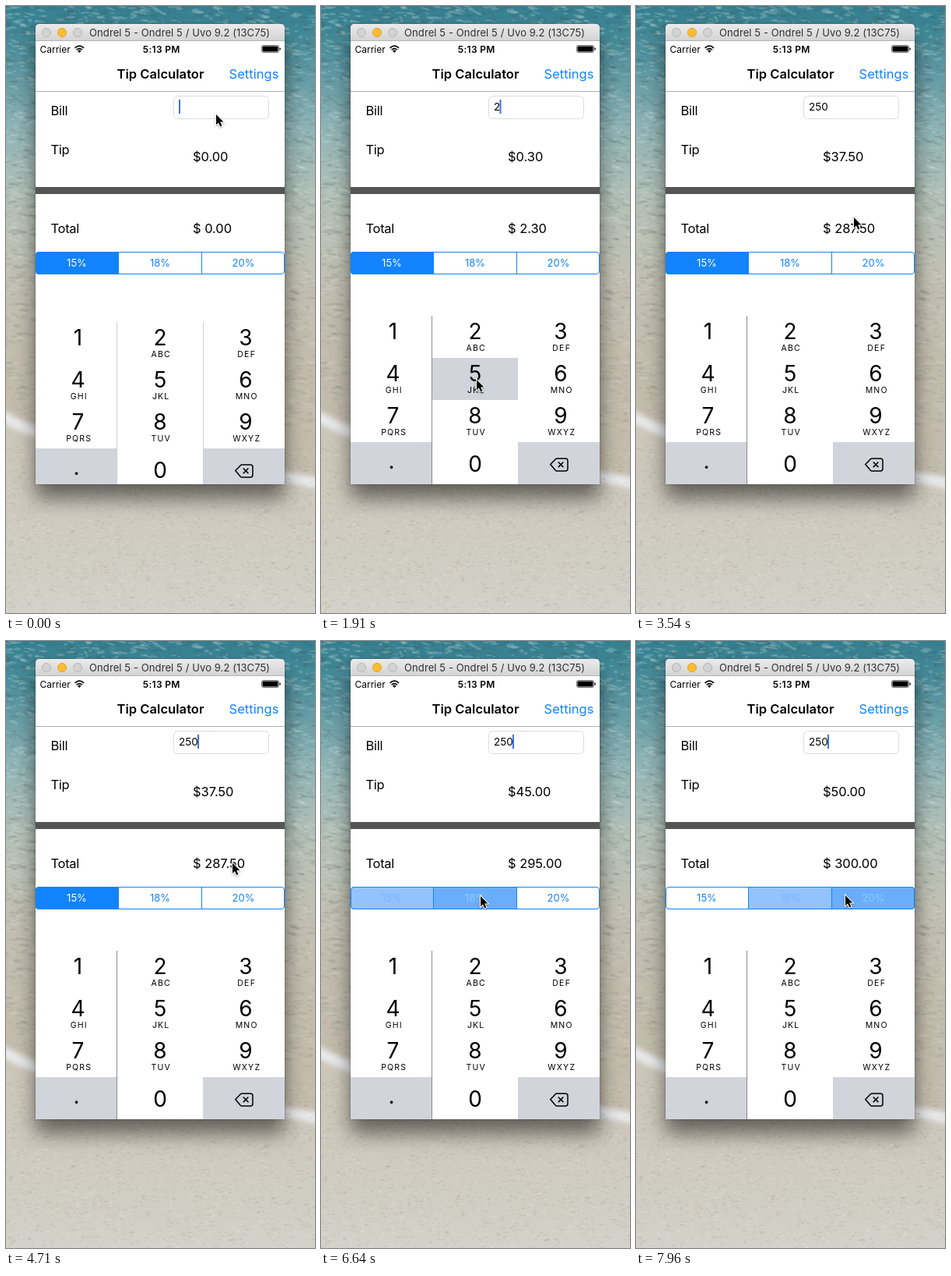
An HTML page with a canvas that plays this animation: 397 by 778 pixels, repeating every 8000 ms.

```html
<!DOCTYPE html>
<html lang="en">
<head>
<meta charset="utf-8">
<title>Tip Calculator</title>
<style>
html, body { margin: 0; width: 100%; height: 100%; overflow: hidden; background: #c4c0b2; }
canvas, svg, .shadow { position: absolute; left: 0; top: 0; }
.shadow { left: 38px; top: 23px; width: 320px; height: 590px; border-radius: 5px 5px 0 0;
  box-shadow: 0 18px 26px rgba(0,0,0,.52), 0 0 3px rgba(0,0,0,.3); }
text { font-family: Inter, Roboto, sans-serif; white-space: pre; }
.label { font-size: 16.5px; letter-spacing: -.3px; }
.nav { font-size: 16.5px; letter-spacing: .05px; }
.value { font-size: 16.5px; letter-spacing: -.05px; }
.small { font-size: 12px; }
.seg { font-size: 13px; text-anchor: middle; }
.digit { font-size: 28px; text-anchor: middle; }
.letters { font-size: 10.5px; letter-spacing: 1.2px; text-anchor: middle; }
</style>
</head>
<body>
<canvas id="beach" width="397" height="778"></canvas>
<div class="shadow"></div>
<svg width="397" height="778" viewBox="0 0 397 778">
  <defs>
    <linearGradient id="bar" x2="0" y2="1">
      <stop stop-color="#ebebeb"/><stop offset="1" stop-color="#d3d3d3"/>
    </linearGradient>
    <clipPath id="screen"><rect x="38" y="45" width="320" height="568"/></clipPath>
    <clipPath id="segClip"><rect x="38" y="315" width="320" height="29" rx="4"/></clipPath>
  </defs>

  <!-- window bar -->
  <path d="M38 45V28q0-5 5-5H353q5 0 5 5V45z" fill="url(#bar)"/>
  <rect x="38" y="44" width="320" height="1" fill="#b4b4b4"/>
  <g fill="#d3d3d3" stroke="#b6b6b6">
    <circle cx="52" cy="34" r="5.5"/>
    <circle cx="72" cy="34" r="5.5" fill="#fdbd2f" stroke="#e0a028"/>
    <circle cx="92" cy="34" r="5.5"/>
  </g>
  <text x="107" y="39" font-size="13" letter-spacing=".1" fill="#303030">Ondrel 5 - Ondrel 5 / Uvo 9.2 (13C75)</text>

  <!-- status and navigation -->
  <rect x="38" y="45" width="320" height="568" fill="#fff"/>
  <text class="small" x="43.5" y="60">Carrier</text>
  <path d="M88.6 53.8Q94.3 48.6 100 53.8M90.7 56.2Q94.3 52.9 97.9 56.2" fill="none" stroke="#000" stroke-width="1.7"/>
  <path d="M94.3 60l-2.3-2.5q2.3-1.9 4.6 0z"/>
  <text class="small" x="199.7" y="60" text-anchor="middle" font-weight="600" letter-spacing=".3">5:13 PM</text>
  <rect x="328.5" y="50.5" width="22" height="9" rx="2" fill="#fff" stroke="#555" stroke-width=".8"/>
  <rect x="329.5" y="51.5" width="20" height="7" rx="1"/>
  <path d="M351.5 53.2q1.5 .3 1.5 1.8t-1.5 1.8z"/>
  <text class="nav" x="198.5" y="93" text-anchor="middle" font-weight="600">Tip Calculator</text>
  <text class="nav" x="286.5" y="93" fill="#1283fd">Settings</text>
  <rect x="38" y="109" width="320" height="1" fill="#b3b3b3"/>

  <!-- form -->
  <text class="label" x="57.5" y="140">Bill</text>
  <text class="label" x="57.5" y="190">Tip</text>
  <text class="label" x="57.5" y="291">Total</text>
  <text class="value" id="tip" x="240" y="199"></text>
  <text class="value" id="total" x="240" y="291"></text>
  <rect x="215.5" y="115.5" width="122" height="29" rx="5" fill="#fff" stroke="#dcdcdc"/>
  <text id="bill" x="222" y="134" font-size="13.5"></text>
  <rect id="caret" y="120" width="2" height="18" fill="#3c72e4"/>
  <rect x="38" y="232" width="320" height="9" fill="#555"/>

  <g id="segments" clip-path="url(#segClip)"></g>
  <path d="M144.5 316V344M251.5 316V344M42 315.5H354q3.5 0 3.5 3.5V340q0 3.5-3.5 3.5H42q-3.5 0-3.5-3.5V319q0-3.5 3.5-3.5z" fill="none" stroke="#1283fd"/>

  <g clip-path="url(#screen)"><g id="pad"></g></g>

  <path id="cursor" d="M1 2V15.2L4 12.4L6.3 17.4L8.4 16.5L6.2 11.6H10.4z"
    stroke="#fff" stroke-width="2" paint-order="stroke"
    style="filter:drop-shadow(0 1px 1px rgba(0,0,0,.35))"/>
</svg>
<script>
const LOOP = 8000, TICK = 147.5;
const BLUE = '#1283fd', KEY_GREY = '#d1d4db';
const $ = id => document.getElementById(id);

function add(parent, tag, attrs, text) {
  const el = document.createElementNS('http://www.w3.org/2000/svg', tag);
  set(el, attrs);
  if (text) el.textContent = text;
  return parent.appendChild(el);
}
function set(el, attrs) {
  for (const name in attrs) el.setAttribute(name, attrs[name]);
}

// Beach backdrop
function paintBeach() {
  const c = $('beach').getContext('2d');
  let seed = 7;
  const rnd = () => (seed = seed * 16807 % 2147483647) / 2147483647;
  const fill = stops => {
    const g = c.createLinearGradient(0, 0, 0, 778);
    stops.forEach(([y, col]) => g.addColorStop(y / 778, col));
    c.fillStyle = g;
  };
  fill([[0, '#347f90'], [45, '#478c9a'], [100, '#699fa8'], [150, '#8bb2b5'], [210, '#a5bcb7'],
    [270, '#b8c1b7'], [340, '#c1c0b3'], [430, '#c2bcad'], [520, '#c3bcac'], [778, '#c3bcac']]);
  c.fillRect(0, 0, 397, 778);

  // choppy water, calmer towards the shore
  for (let i = 0; i < 5200; i++) {
    const x = rnd() * 397, y = rnd() * 545, w = 1.5 + rnd() * 6;
    const a = .2 - y / 4500;
    c.fillStyle = rnd() < .5 ? `rgba(240,246,240,${a})` : `rgba(70,85,80,${a * .8})`;
    c.beginPath();
    c.ellipse(x, y, w, .6 + rnd() * 1.4, rnd() * .6 - .2, 0, 7);
    c.fill();
  }

  // sand below the foam edge
  c.filter = 'blur(3px)';
  const edge = () => {
    c.beginPath();
    c.moveTo(-10, 522);
    c.bezierCurveTo(40, 555, 120, 570, 220, 582);
    c.bezierCurveTo(300, 592, 360, 604, 410, 613);
  };
  edge();
  c.lineTo(410, 800);
  c.lineTo(-10, 800);
  fill([[0, '#cdc7b9'], [530, '#cdc7b9'], [620, '#cdc8bb'], [690, '#cfccc1'], [778, '#d3d1c9']]);
  c.fill();
  edge();
  c.lineWidth = 14;
  c.strokeStyle = 'rgba(238,240,245,.85)';
  c.stroke();
  c.filter = 'none';

  for (let i = 0; i < 3600; i++) {
    c.fillStyle = rnd() < .5 ? 'rgba(255,255,255,.12)' : 'rgba(90,80,60,.08)';
    c.fillRect(rnd() * 397, 560 + rnd() * 218, 1 + rnd() * 4, 1 + rnd());
  }
}

// Segmented control
const segs = ['15%', '18%', '20%'].map((label, i) => ({
  box: add($('segments'), 'rect', { x: [38, 145, 252][i], y: 315, width: 107, height: 29 }),
  text: add($('segments'), 'text', { class: 'seg', x: [91, 198, 305][i], y: 334 }, label)
}));

// Number pad
const pad = $('pad'), keys = {};
const colX = [38, 143, 253], colW = [105, 110, 105], midX = [92.5, 198, 308];
const letters = ['', 'ABC', 'DEF', 'GHI', 'JKL', 'MNO', 'PQRS', 'TUV', 'WXYZ'];
for (let i = 0; i < 12; i++) {
  const col = i % 3, row = Math.floor(i / 3), y = 397 + row * 54;
  const side = row === 3 && col !== 1;
  const name = row < 3 ? String(i + 1) : ['.', '0', ''][col];
  keys[name] = add(pad, 'rect', { x: colX[col], y, width: colW[col], height: 54, fill: side ? KEY_GREY : '#fff' });
  if (name === '.') add(pad, 'text', { class: 'digit', x: 90.5, y: y + 34 }, name);
  else if (name) add(pad, 'text', { class: 'digit', x: midX[col], y: y + (row < 3 ? 30 : 37.5) }, name);
  if (letters[i]) add(pad, 'text', { class: 'letters', x: midX[col] + 1.2, y: y + 45 }, letters[i]);
}
add(pad, 'path', {
  d: 'M294.8 587.5L301.3 580.7Q302 580 303 580H314Q317 580 317 583V593Q317 596 314 596H303Q302 596 301.3 595.3zM304.8 584.5l6.6 6.6m0-6.6l-6.6 6.6',
  fill: 'none', stroke: '#000', 'stroke-width': 1.5
});
const leftLine = add(pad, 'rect', { x: 142, y: 397, width: 1, height: 216 });
const rightLine = add(pad, 'rect', { x: 253, y: 397, width: 1, height: 216, fill: '#cdcfd2' });

// Pointer waypoints: tick, x, y
const path = [[0, 269, 137], [1, 268, 142], [3, 250, 215], [5, 215, 365], [7, 201, 408], [10, 201, 408],
  [12, 199, 474], [13, 199, 477], [14, 199, 477], [16, 198, 549], [17, 195, 577], [21, 195, 577],
  [22, 214, 520], [24, 279, 269], [29, 279, 269], [33, 301, 296], [37, 293, 281], [40, 290, 278],
  [41, 281, 288], [43, 210, 325], [44, 204, 325], [49, 204, 325], [52, 262, 324], [53, 268, 324], [55, 268, 324]];

function pointer(k) {
  const i = path.findIndex(p => p[0] > k);
  const [a, ax, ay] = path[i - 1], [b, bx, by] = path[i];
  const f = (k - a) / (b - a);
  return [ax + (bx - ax) * f, ay + (by - ay) * f];
}

function caretOn(k) {
  if (k < 10) return k % 6 !== 3 && k % 6 !== 4;
  if (k < 23 || k > 52) return true;
  return k % 6 !== 5 && k % 6 !== 0;
}

// A tap tints the new segment, then both segments cross-fade.
function drawSegments(k) {
  const now = k < 45 ? 0 : k < 54 ? 1 : 2;
  const fading = k === 45 || k === 54;
  const pressed = k === 44 ? 1 : k === 53 ? 2 : -1;
  segs.forEach((s, i) => {
    let box = '#fff', text = BLUE;
    if (i === now) [box, text] = fading ? ['#6aaefb', '#92c6ff'] : [BLUE, '#fff'];
    else if (fading && i === now - 1) [box, text] = ['#92c3fe', '#7fb5fa'];
    else if (i === pressed) box = '#d6e9ff';
    s.box.setAttribute('fill', box);
    s.text.setAttribute('fill', text);
  });
  return [.15, .18, .2][now];
}

let last = -1;
function draw(k) {
  const bill = '250'.slice(0, k < 10 ? 0 : k < 14 ? 1 : k < 18 ? 2 : 3);
  const rate = drawSegments(k);
  $('bill').textContent = bill;
  $('tip').textContent = '$' + (bill * rate).toFixed(2);
  $('total').textContent = '$ ' + (bill * (1 + rate)).toFixed(2);
  set($('caret'), { x: [222, 229.5, 237.5, 246][bill.length], visibility: caretOn(k) ? 'visible' : 'hidden' });

  keys[2].setAttribute('fill', k === 9 || k === 10 ? KEY_GREY : '#fff');
  keys[5].setAttribute('fill', k === 13 ? KEY_GREY : '#fff');
  pad.setAttribute('transform', `translate(0 ${k ? 0 : 8})`);
  leftLine.setAttribute('fill', k ? '#8b8b8b' : '#cdcfd2');
  rightLine.setAttribute('visibility', k ? 'hidden' : 'visible');
  $('cursor').setAttribute('transform', `translate(${pointer(k)})`);
}

function frame() {
  const t = performance.now() % LOOP;
  const k = Math.min(54, Math.floor((t + 7.5) / TICK));
  if (k !== last) draw(last = k);
  requestAnimationFrame(frame);
}

paintBeach();
frame();
</script>
</body>
</html>
```
